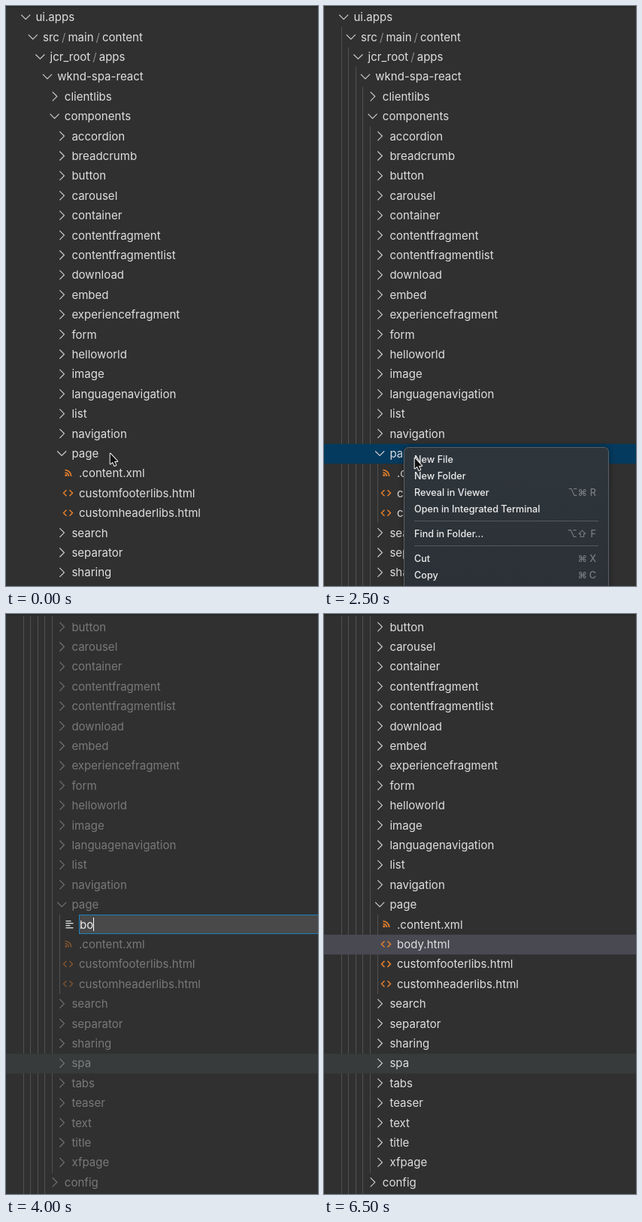
Animation, 415 px wide and 772 px high, one loop 7200 ms. Source, as an HTML page with a canvas:

```html
<!DOCTYPE html>
<html lang="en">
<head>
<meta charset="utf-8">
<title>Adding a file in the explorer</title>
<style>
  html, body { margin: 0; width: 100%; height: 100%; overflow: hidden; background: #303030; }
  canvas { display: block; width: 415px; height: 772px; }
</style>
</head>
<body>
<canvas id="stage" width="415" height="772"></canvas>
<script>
const ctx = document.getElementById('stage').getContext('2d');
const W = 415, H = 772, LOOP = 7200, STEP = 100;
const ROW = 26.4, TOP = 2, INDENT = 9.6, SCROLL = 208.8;
const TEXT = '#dedede', ORANGE = '#e37f2d', FOCUS = '#043a5e', HOVER = '#373b3b', SELECTED = '#494952';
const TREE_FONT = '15.05px Inter, sans-serif';
const MENU_FONT = '500 12.65px Inter, "DejaVu Sans", sans-serif';

// Tree rows
const folder = (depth, name, open = false) => ({ depth, name, kind: open ? 'open' : 'closed' });
const file = (name, kind = 'html') => ({ depth: 6, name, kind });
const folders = (depth, names) => names.split(' ').map(name => folder(depth, name));

const before = [
  folder(0, 'ui.apps', true), folder(1, 'src/main/content', true), folder(2, 'jcr_root/apps', true),
  folder(3, 'wknd-spa-react', true), folder(4, 'clientlibs'), folder(4, 'components', true),
  ...folders(5, 'accordion breadcrumb button carousel container contentfragment contentfragmentlist ' +
    'download embed experiencefragment form helloworld image languagenavigation list navigation'),
  folder(5, 'page', true)
];
const xml = file('.content.xml', 'feed');
const after = [
  file('customfooterlibs.html'), file('customheaderlibs.html'),
  ...folders(5, 'search separator sharing spa tabs teaser text title xfpage'),
  ...folders(4, 'config config.author')
];
const plainTree = [...before, xml, ...after];
const inputTree = [...before, { depth: 6, name: '', kind: 'input' }, xml, ...after];
const finalTree = [...before, xml, file('body.html'), ...after];

const typing = [[3600, 'b'], [4000, 'bo'], [4200, 'bod'], [4400, 'body'], [4900, 'body.'],
  [5200, 'body.h'], [5400, 'body.ht'], [5600, 'body.html']];

// Drawing helpers
function rect(x, y, w, h, color) {
  ctx.fillStyle = color;
  ctx.fillRect(x, y, w, h);
}
function line(points, color, width = 1.2) {
  ctx.beginPath();
  points.forEach(([x, y]) => ctx.lineTo(x, y));
  ctx.strokeStyle = color;
  ctx.lineWidth = width;
  ctx.stroke();
}
function write(text, x, y, color, font = TREE_FONT, align = 'left') {
  ctx.font = font;
  ctx.textAlign = align;
  ctx.fillStyle = color;
  ctx.fillText(text, x, y);
  return x + ctx.measureText(text).width;
}
function writePath(name, x, y) {
  name.split('/').forEach((part, i) => {
    if (i) x = write('/', x + 3, y, '#8a8a8a') + 3;
    x = write(part, x, y, TEXT);
  });
}

const icons = {
  open: (x, y) => line([[x - 6, y - 3], [x, y + 3], [x + 6, y - 3]], '#cccccc'),
  closed: (x, y) => line([[x - 2.8, y - 6], [x + 3.2, y], [x - 2.8, y + 6]], '#cccccc'),
  html(x, y) {
    for (const side of [-1, 1])
      line([[x + side * 2, y - 4], [x + side * 6, y], [x + side * 2, y + 4]], ORANGE, 1.5);
  },
  feed(x, y) {
    const left = x - 4, bottom = y + 4;
    ctx.strokeStyle = ctx.fillStyle = ORANGE;
    ctx.lineWidth = 1.8;
    for (const radius of [4.8, 8.2]) {
      ctx.beginPath();
      ctx.arc(left, bottom, radius, -Math.PI / 2, 0);
      ctx.stroke();
    }
    ctx.beginPath();
    ctx.arc(left + 1.3, bottom - 1.3, 1.5, 0, 7);
    ctx.fill();
  },
  lines(x, y) {
    [7, 10, 6, 10].forEach((w, i) => rect(x - 3, Math.floor(y) - 5 + i * 3, w, 1.4, '#d4d7d6'));
  },
  header: (x, y) => write('C', x, y + 5, '#a886d0', '800 15px Inter, sans-serif', 'center')
};

function drawInput(y, t) {
  const name = typing.reduce((text, [start, value]) => t >= start ? value : text, '');
  const icon = name.endsWith('.html') ? 'html' : name.endsWith('.h') ? 'header' : 'lines';
  icons[icon](82.5, y - 0.5);
  rect(97, 400, W, 26, '#1b81bd');
  rect(98, 401, W, 24, '#494949');
  const end = write(name, 98, Math.round(y + 5), '#eeeeee');
  if (t < 3400 || t >= 3600) rect(Math.round(end), 404, 1, 18, '#ffffff');
}

function drawTree(rows, { scroll = 0, guides = 1, dim = 1, marks = {}, t }) {
  rows.forEach((row, i) => {
    const top = TOP + i * ROW - scroll, y = top + ROW / 2;
    if (top > H || top < -ROW) return;

    const guideTop = Math.round(top), guideEnd = Math.round(top + ROW);
    ctx.globalAlpha = guides;
    for (let d = 0; d < row.depth; d++)
      rect(Math.floor(23 + d * INDENT), guideTop, 1, guideEnd - guideTop, '#515151');
    ctx.globalAlpha = 1;
    if (marks[row.name]) rect(0, top, W, ROW, marks[row.name]);

    if (row.kind === 'input') return drawInput(y, t);
    ctx.globalAlpha = dim;
    const isFile = row.depth === 6;
    icons[row.kind](isFile ? 82.5 : 26.2 + row.depth * INDENT, y - 0.5);
    writePath(row.name, 39.4 + row.depth * INDENT, Math.round(y + 5));
    ctx.globalAlpha = 1;
  });
  rect(0, 0, W, 2, '#282828');
}

function drawMenu(alpha) {
  ctx.globalAlpha = alpha;
  const shade = ctx.createLinearGradient(0, 587, 0, H);
  shade.addColorStop(0, '#2e363c');
  shade.addColorStop(1, '#2b3136');
  ctx.shadowColor = 'rgba(0,0,0,.45)';
  ctx.shadowBlur = 10;
  ctx.fillStyle = shade;
  ctx.beginPath();
  ctx.roundRect(106.5, 587.5, 272, 220, 6);
  ctx.fill();
  ctx.shadowBlur = 0;
  ctx.strokeStyle = '#596066';
  ctx.lineWidth = 1;
  ctx.stroke();

  const items = [['New File', 603], ['New Folder', 625], ['Reveal in Viewer', 647, '⌥⌘', 'R'],
    ['Open in Integrated Terminal', 669], ['Find in Folder...', 702, '⌥⇧', 'F'],
    ['Cut', 735, '⌘', 'X'], ['Copy', 757, '⌘', 'C']];
  for (const [label, y, symbols, key] of items) {
    write(label, 120, y + 4.5, '#ececec', MENU_FONT);
    if (!key) continue;
    write(symbols, 350, y + 4.5, '#777d82', MENU_FONT, 'right');
    write(key, 362, y + 4.5, '#777d82', MENU_FONT, 'right');
  }
  for (const y of [685, 718]) rect(120, y, 245, 1, '#53595e');
  ctx.globalAlpha = 1;
}

function drawPointer(x, y, shape, fill, outline) {
  ctx.save();
  ctx.translate(x, y);
  const path = new Path2D(shape);
  ctx.lineJoin = 'round';
  ctx.lineWidth = 2;
  ctx.strokeStyle = outline;
  ctx.stroke(path);
  ctx.fillStyle = fill;
  ctx.fill(path);
  ctx.restore();
}
const ARROW = 'M.7 .7V14.6L3.9 11.7 6.3 17 8.3 16.1 6 10.9H10.2Z';
const HAND = 'M4 1Q5.3 0 6 1.6L7 5.2Q8.4 4.3 9.2 5.6 10.6 5 11.2 6.4 12.6 6.2 12.8 7.8' +
  'L12.6 11.4 11.4 14.6H5.6L3.6 11.8 1 8.8Q1 7.2 2.6 7.8L4.4 9.2 3 2.6Q2.9 1.4 4 1Z';

// Timeline
function glide(t, start, end, from, to) {
  const p = Math.min(1, Math.max(0, (t - start) / (end - start)));
  return from + (to - from) * p * p * (3 - 2 * p);
}
function arrowPosition(t) {
  if (t < 400) return [glide(t, 0, 200, 138, 119), 595];
  if (t < 2000) return [glide(t, 300, 1100, 119, 103), glide(t, 300, 1100, 595, 593.5)];
  return [glide(t, 1900, 2500, 103, 120), glide(t, 1900, 2500, 593.5, 601)];
}

function draw(t) {
  rect(0, 0, W, H, '#303030');
  if (t < 2800) {
    const clicked = t >= 1500;
    drawTree(plainTree, { guides: glide(t, 300, 700, 0, 1), marks: clicked ? { page: FOCUS } : {} });
    if (clicked) drawMenu(t < 2700 ? 1 : 0.6);
    drawPointer(...arrowPosition(t), ARROW, '#111111', '#f4f4f4');
  } else if (t < 6200) {
    drawTree(inputTree, { scroll: SCROLL, dim: 0.42, marks: { spa: HOVER }, t });
    if (t < 3700) drawPointer(116.5, 602.5, HAND, '#ffffff', '#202020');
  } else if (t < 6300) {
    drawTree(plainTree, { scroll: SCROLL, marks: { page: FOCUS, tabs: HOVER } });
  } else {
    drawTree(finalTree, { scroll: SCROLL, marks: { 'body.html': SELECTED, spa: HOVER } });
  }
}

function frame() {
  const t = performance.now() % LOOP;
  draw(Math.floor(t / STEP) * STEP);
  requestAnimationFrame(frame);
}
frame();
</script>
</body>
</html>
```
